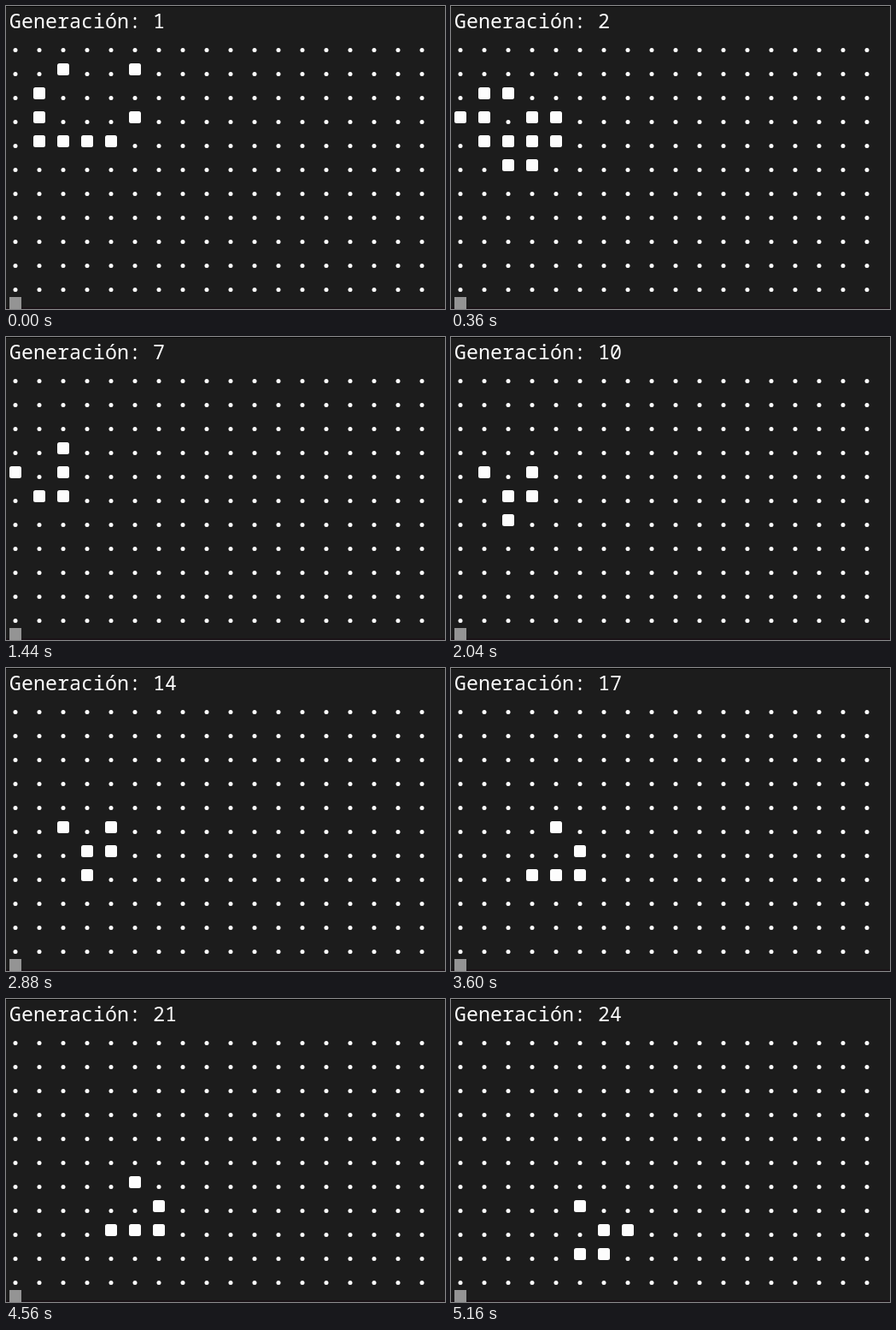
Animation of 514x354 px, one loop 5400 ms. Source, as an HTML page:

```html
<!DOCTYPE html>
<html lang="es">
<head>
<meta charset="utf-8">
<title>Juego de la vida</title>
<style>
  html, body { margin: 0; width: 100%; height: 100%; overflow: hidden; background: #1c1c1c; }
  svg { display: block; width: 514px; height: 354px; }
  text { font: 500 23.33px "Noto Sans Mono", "DejaVu Sans Mono", monospace; fill: #fdfdfd; white-space: pre; }
  .cell circle, .cell rect { fill: #fdfdfd; }
  .cell rect, .cell.alive circle { display: none; }
  .cell.alive rect { display: inline; }
</style>
</head>
<body>
<svg viewBox="0 0 514 354">
  <rect width="514" height="354" fill="#1c1c1c"/>
  <rect width="514" height="1" fill="#050505"/>
  <rect y="352" width="514" height="2" fill="#1a1317"/>
  <text id="title" x="4" y="26">Generación: 1</text>
  <g id="board"></g>
  <rect x="4" y="340" width="14" height="14" fill="#949494"/>
</svg>
<script>
  const COLS = 18, ROWS = 11, PITCH = 28, LOOP = 5400, LAST = 24;
  const SEED = [[1, 2], [1, 5], [2, 1], [3, 1], [3, 5], [4, 1], [4, 2], [4, 3], [4, 4]];
  const QUICK = new Set([8, 14, 22]); // generations that arrive after a half step

  const title = document.getElementById('title');
  const board = document.getElementById('board');

  function add(parent, tag, attrs) {
    const el = document.createElementNS('http://www.w3.org/2000/svg', tag);
    for (const key in attrs) el.setAttribute(key, attrs[key]);
    return parent.appendChild(el);
  }

  const cells = Array.from({ length: ROWS * COLS }, (_, i) => {
    const x = 4 + PITCH * (i % COLS);
    const y = 39 + PITCH * Math.floor(i / COLS);
    const cell = add(board, 'g', { class: 'cell' });
    add(cell, 'circle', { cx: x + 7, cy: y + 12.5, r: 2.5 });
    add(cell, 'rect', { x, y, width: 14, height: 14, rx: 2.5 });
    return cell;
  });

  function neighbours(grid, row, col) {
    let n = 0;
    for (let r = row - 1; r <= row + 1; r++)
      for (let c = col - 1; c <= col + 1; c++)
        if ((r !== row || c !== col) && r >= 0 && r < ROWS && c >= 0 && c < COLS && grid[r * COLS + c]) n++;
    return n;
  }

  function evolve(grid) {
    return grid.map((alive, i) => {
      const n = neighbours(grid, Math.floor(i / COLS), i % COLS);
      return n === 3 || (alive && n === 2);
    });
  }

  const first = Array(ROWS * COLS).fill(false);
  for (const [r, c] of SEED) first[r * COLS + c] = true;

  const history = [{ start: 0, grid: first }];
  for (let gen = 2; gen <= LAST; gen++) {
    const prev = history[gen - 2];
    history.push({ start: prev.start + (QUICK.has(gen) ? 120 : 240), grid: evolve(prev.grid) });
  }

  let shown = 0;
  function draw(time) {
    const gen = history.filter(h => h.start <= time).length;
    if (gen === shown) return;
    shown = gen;
    title.textContent = 'Generación: ' + gen;
    history[gen - 1].grid.forEach((alive, i) => cells[i].classList.toggle('alive', alive));
  }

  const begin = performance.now();
  function tick() {
    draw((performance.now() - begin) % LOOP);
    requestAnimationFrame(tick);
  }
  tick();
</script>
</body>
</html>
```
